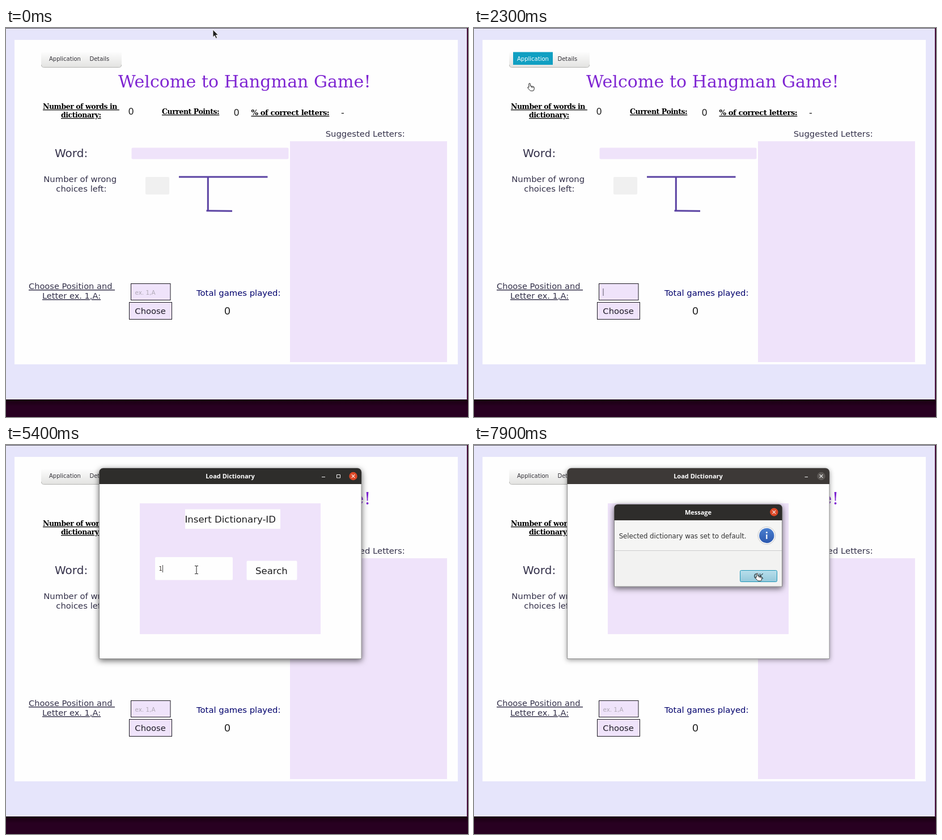
Recreate the animation shown at these times as an HTML page. Size 815 by 687 pixels, loop 8 s.

```html
<!DOCTYPE html>
<html lang="en">
<head>
<meta charset="utf-8">
<title>Hangman</title>
<style>
  html, body { margin: 0; width: 100%; height: 100%; overflow: hidden; background: #e6e5fb; }
  svg { display: block; width: 815px; height: 687px; }
  text { font: 14.8px "DejaVu Sans", sans-serif; fill: #34314a; white-space: pre; }
  .title { font: 30px "DejaVu Serif", "Noto Serif", serif; fill: #7f26d2; letter-spacing: .07px; }
  .small { font-size: 10px; fill: #333138; }
  .hint { fill: #b0a9b6; }
  .stat { font: bold 12.5px "DejaVu Serif", "Noto Serif", serif; letter-spacing: -.45px; fill: #000; text-decoration: underline; }
  .num { font-size: 16px; fill: #222; }
  .big { font-size: 16.5px; fill: #1c1c1e; }
  .under { font-size: 14.6px; text-decoration: underline; }
  .bar { font: bold 11px "Open Sans", "Noto Sans", sans-serif; fill: #fff; text-anchor: middle; }
  .lilac { fill: #efe3fa; }
  .white { fill: #fefefe; }
  .box { fill: #efe3fa; stroke: #1d1a22; }
  .glyph { fill: none; stroke: #f2f2f2; }
</style>
</head>
<body>
<svg viewBox="0 0 815 687">
  <defs>
    <linearGradient id="deskFill" x2="0" y2="1"><stop stop-color="#17000f"/><stop offset=".4" stop-color="#280021"/></linearGradient>
    <linearGradient id="barFill" x2="0" y2="1"><stop stop-color="#fcfcfc"/><stop offset="1" stop-color="#e3e3e1"/></linearGradient>
    <linearGradient id="okFill" x2="0" y2="1"><stop stop-color="#b9dfec"/><stop offset="1" stop-color="#94c8da"/></linearGradient>
    <linearGradient id="infoFill" x2="0" y2="1"><stop stop-color="#4a7fd0"/><stop offset="1" stop-color="#2c58ae"/></linearGradient>
    <filter id="soft" x="-20%" y="-20%" width="140%" height="140%"><feDropShadow dx="0" dy="2" stdDeviation="3" flood-opacity=".4"/></filter>
    <filter id="deep" x="-20%" y="-20%" width="140%" height="140%"><feDropShadow dx="0" dy="3" stdDeviation="5.5" flood-opacity=".6"/></filter>
    <filter id="faint" x="-20%" y="-20%" width="140%" height="140%"><feDropShadow dx="0" dy="2" stdDeviation="4" flood-opacity=".4"/></filter>
  </defs>

  <!-- Desktop and main window -->
  <rect y="656" width="815" height="31" fill="url(#deskFill)"/>
  <rect x="813" width="2" height="657" fill="#430a36"/>
  <rect width="813" height="656" fill="#e6e5fb"/>
  <rect width="813" height="1" fill="#55535c"/>
  <rect class="white" x="15" y="21" width="782" height="573"/>

  <path d="M62 43H204V65a4 4 0 0 1-4 4H66a4 4 0 0 1-4-4z" fill="url(#barFill)"/>
  <path d="M62.5 65a4 4 0 0 0 4 4.5H199.5a4 4 0 0 0 4-4.5" fill="none" stroke="#b5b5b3"/>
  <rect id="appGlow" x="69" y="42.5" width="70" height="22.5" fill="#109fc2"/>
  <text id="appLabel" class="small" x="76" y="58">Application</text>
  <text class="small" x="147.5" y="58">Details</text>

  <text class="title" x="198" y="105">Welcome to Hangman Game!</text>
  <text class="stat" x="65" y="143">Number of words in&#160;</text>
  <text class="stat" x="97" y="158">dictionary:</text>
  <text class="stat" x="275" y="152">Current Points:</text>
  <text class="stat" x="432.5" y="154" style="font-size:13.2px">% of correct letters:</text>
  <text class="num" x="215.5" y="153">0</text>
  <text class="num" x="401.5" y="155">0</text>
  <text class="num" x="591" y="155">-</text>

  <text x="563.7" y="192">Suggested Letters:</text>
  <rect class="lilac" x="501" y="200" width="277" height="390"/>
  <text x="86" y="228" style="font-size:20px">Word:</text>
  <rect class="lilac" x="221.5" y="211.5" width="277" height="20" rx="2"/>
  <text x="66.3" y="272">Number of wrong</text>
  <text x="88.3" y="289">choices left:</text>
  <rect x="246" y="263" width="42" height="31" rx="2" fill="#f0f0f0"/>
  <path d="M305 263H461.5M356.3 263V323M353.5 322.7L399 323.2" fill="none" stroke="#5b43a3" stroke-width="3"/>

  <text class="under" x="40" y="461">Choose Position and&#160;</text>
  <text class="under" x="64" y="478">Letter ex. 1,A:</text>
  <rect class="box" x="220.5" y="451.5" width="69.5" height="29"/>
  <text id="guessHint" class="hint" x="227.5" y="470.5" style="font-size:10.4px">ex. 1,A</text>
  <rect id="guessCaret" x="227.5" y="460" width="1" height="13" fill="#5c5666"/>
  <rect class="box" x="217.5" y="484.5" width="75" height="30"/>
  <text x="227.3" y="505" style="fill:#1f1c28">Choose</text>
  <text x="336" y="472.5" style="fill:#00006c">Total games played:</text>
  <text class="num" x="384.7" y="506" style="font-size:18px">0</text>

  <g id="menu">
    <rect x="69" y="65.5" width="51.5" height="86.5" fill="#fbfbfb" filter="url(#soft)"/>
    <rect id="menuGlow" x="69.5" width="50.5" height="20" fill="#109fc2"/>
    <g id="menuItems"></g>
  </g>

  <g id="loader">
    <path id="loaderFrame" d="M164.5 377.5V48a7 7 0 0 1 7-7H620a7 7 0 0 1 7 7V377.5z" class="white" stroke="#8b8b8b"/>
    <path id="loaderBar" d="M164.5 69V48a7 7 0 0 1 7-7H620a7 7 0 0 1 7 7V69z"/>
    <text class="bar" x="395.5" y="59">Load Dictionary</text>
    <path id="resizable" class="glyph" d="M557 56.5h6M583.5 52.5h6v5.5h-6z"/>
    <path id="fixed" class="glyph" d="M583.5 56.5h5.5"/>
    <circle id="loaderClose" cx="612.5" cy="55" r="7.2"/>
    <path class="glyph" d="M609.7 52.2l5.6 5.6m0-5.6l-5.6 5.6" stroke-width="1.2"/>
    <rect class="lilac" x="236" y="103" width="319" height="231"/>
    <rect class="white" x="316" y="113.5" width="168" height="34.5"/>
    <text class="big" x="315.5" y="137">Insert Dictionary-ID</text>
    <rect class="white" x="263" y="198" width="137" height="40.5" rx="2"/>
    <text id="idText" class="small" x="269.5" y="222"></text>
    <rect id="idCaret" y="212" width="1" height="13" fill="#444"/>
    <rect class="white" x="424.5" y="204.5" width="89" height="34" rx="2"/>
    <text class="big" x="440" y="228">Search</text>
  </g>

  <g id="message">
    <path d="M247.5 250V111a6 6 0 0 1 6-6H537.5a6 6 0 0 1 6 6V250z" fill="#f2f2f1" stroke="#858585" filter="url(#deep)"/>
    <path d="M247.5 133V111a6 6 0 0 1 6-6H537.5a6 6 0 0 1 6 6V133z" fill="#2e2d2b"/>
    <text class="bar" x="395.5" y="123">Message</text>
    <circle cx="529.3" cy="118.5" r="7.2" fill="#dd4726"/>
    <path class="glyph" d="M526.5 115.7l5.6 5.6m0-5.6l-5.6 5.6" stroke-width="1.2"/>
    <rect x="248" y="133" width="295" height="53" fill="#f5f5f4"/>
    <path d="M248 186.5H543" stroke="#cdcdcd"/>
    <text x="255.7" y="164.5" style="font-size:11.7px;fill:#303030">Selected dictionary was set to default.</text>
    <circle cx="516.3" cy="160" r="15.5" fill="#fafafa" stroke="#c9c9c9"/>
    <circle cx="516.3" cy="160" r="13.2" fill="url(#infoFill)"/>
    <path d="M516.3 158v8" stroke="#fff" stroke-width="2.2"/>
    <circle cx="516.3" cy="154.5" r="1.5" fill="#fff"/>
    <rect x="469.5" y="221.5" width="65" height="20" rx="2" fill="url(#okFill)" stroke="#1e96b8"/>
    <text x="493.5" y="236" style="font-size:11.7px;fill:#26363c">OK</text>
  </g>

  <g id="cursor">
    <path id="arrow" d="M0 0V13.2L3 10.4L5.3 15.4L7.5 14.4L5.3 9.6H9.4z" fill="#1e1e1e" stroke="#fff" stroke-width=".8"/>
    <path id="hand" d="M4 .7Q5.3 .7 5.3 2V5.4L10.5 6.4Q12.6 7 12.4 8.8L11.8 12Q11.4 14 9.8 14H6.4Q5 14 4.2 12.7L1 9Q.3 7.7 1.3 7.2L2.8 7.9V2Q2.8 .7 4 .7zM7.6 6V8.6M10 6.6V9" fill="#fff" stroke="#222"/>
    <path id="beam" d="M1 .5H3Q4 .5 4 1.5Q4 .5 5 .5H7M4 1.5V13.5M1 14.5H3Q4 14.5 4 13.5Q4 14.5 5 14.5H7" fill="none" stroke="#222"/>
  </g>
</svg>
<script>
const LOOP = 8000;
const $ = id => document.getElementById(id);
const show = (id, on) => { $(id).style.display = on ? '' : 'none'; };
const within = (t, from, to) => t >= from && t < to;

// [time, pointer, x, y]; each pose holds until the next one
const pointer = [
  [0, 'arrow', 365, 3], [400, 'arrow', 364, 22], [600, 'arrow', 265, 47],
  [800, 'arrow', 232, 49], [900, 'arrow', 200, 49], [1000, 'hand', 150, 47],
  [1100, 'hand', 112, 45], [1200, 'hand', 101, 43], [1500, 'hand', 100, 51],
  [1600, 'hand', 99, 62], [1700, 'hand', 98, 73], [1800, 'hand', 97, 82],
  [1900, 'hand', 96, 89], [2000, 'hand', 95, 94], [2200, 'hand', 94, 97],
  [2600, 'arrow', 128, 104], [2700, 'arrow', 171, 111], [2900, 'arrow', 23, 224],
  [3100, ''],
  [4600, 'arrow', 345, 284], [4700, 'arrow', 342, 262], [4800, 'beam', 338, 232],
  [4900, 'beam', 334, 217], [5000, 'beam', 332, 213], [5500, 'beam', 352, 220],
  [5600, 'arrow', 392, 246], [5700, 'arrow', 436, 267], [5800, 'arrow', 472, 258],
  [5900, 'hand', 482, 234], [6000, 'hand', 480, 224], [6300, ''],
  [7600, 'hand', 523, 229], [7900, 'hand', 495.5, 226]
];

$('menuItems').innerHTML = ['Start', 'Load', 'Create', 'Exit']
  .map((name, i) => `<text class="small" x="75" y="${82 + 20 * i}">${name}</text>`).join('');
const items = [...$('menuItems').children];

function drawMain(t, tipY) {
  const active = within(t, 1100, 2400);
  show('appGlow', active);
  $('appLabel').style.fill = active ? '#fff' : '';
  show('menu', within(t, 1200, 2300));
  const row = Math.floor((tipY - 69) / 20);
  const hovered = row >= 0 && row < items.length;
  show('menuGlow', hovered);
  if (hovered) $('menuGlow').setAttribute('y', 69 + 20 * row);
  items.forEach((item, i) => { item.style.fill = i === row ? '#fff' : ''; });

  const focused = within(t, 1200, 3600);
  show('guessHint', !focused);
  show('guessCaret', focused && (t < 1700 || within(t, 2200, 2700) || t >= 3100));
}

function drawLoader(t) {
  show('loader', t >= 4300);
  show('resizable', t < 6400);
  show('fixed', t >= 6400);
  const behind = t >= 7600;
  $('loaderFrame').setAttribute('filter', `url(#${behind ? 'faint' : 'deep'})`);
  $('loaderBar').style.fill = behind ? '#3d3937' : '#2e2d2b';
  $('loaderClose').style.fill = behind ? '#5c5855' : '#dd4726';

  const typed = t >= 5300;
  $('idText').textContent = typed ? '1' : t < 5000 ? 'DIctionary ID' : '';
  $('idText').style.fill = typed ? '#3b332c' : '#a9a9ab';
  $('idCaret').setAttribute('x', typed ? 276 : 269.5);
  show('idCaret', within(t, 5000, 5800));
  show('message', behind);
}

function draw(t) {
  const [, kind, x = 0, y = 0] = pointer.findLast(pose => t >= pose[0]);
  for (const name of ['arrow', 'hand', 'beam']) show(name, name === kind);
  $('cursor').setAttribute('transform', `translate(${x} ${y})`);
  drawMain(t, y);
  drawLoader(t);
}

const start = performance.now();
function tick() {
  draw((performance.now() - start) % LOOP);
  requestAnimationFrame(tick);
}
tick();
</script>
</body>
</html>
```
